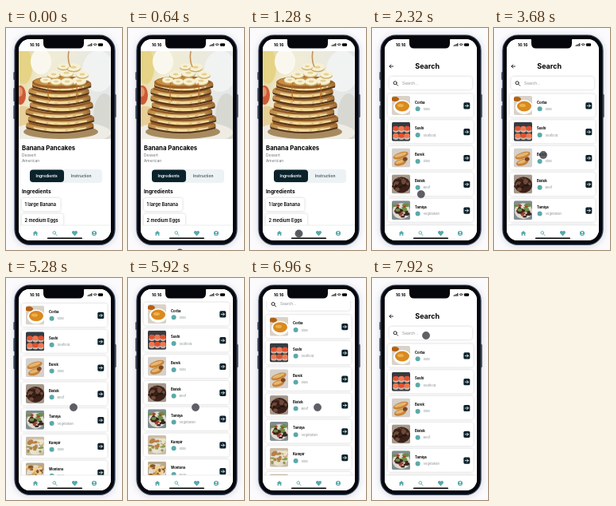
Animation of 146x278 px, one loop 8 s. Source, as an HTML page:

```html
<!DOCTYPE html>
<html lang="en">
<head>
<meta charset="utf-8">
<style>
html, body { margin: 0; width: 100%; height: 100%; overflow: hidden; background: #fbfbfd; }
svg { display: block; width: 100vw; height: 100vh; font-family: Inter, "Open Sans", sans-serif; }
.b { font-weight: 700; }
.m { font-weight: 600; }
.body { filter: drop-shadow(0 1px 4px #8888a050); }
.card { fill: #fff; filter: drop-shadow(0 .5px 1.4px #0003); }
.line { fill: none; stroke-linecap: round; stroke-linejoin: round; }
.grey { fill: #8a8f94; }
</style>
</head>
<body>
<svg viewBox="0 0 146 278">
  <defs>
    <clipPath id="screen"><rect x="16" y="14" width="116" height="252" rx="14"/></clipPath>
    <clipPath id="photo"><rect x="16" y="29" width="116" height="110"/></clipPath>
    <clipPath id="thumb"><rect width="23" height="24" rx="2"/></clipPath>
    <linearGradient id="room" x2="1" y2=".3">
      <stop offset="0" stop-color="#e0cf8c"/><stop offset=".3" stop-color="#f1ecd4"/><stop offset="1" stop-color="#e4e7e8"/>
    </linearGradient>
    <linearGradient id="cake" x2="1">
      <stop offset="0" stop-color="#b98643"/><stop offset=".4" stop-color="#ecd08a"/><stop offset=".75" stop-color="#dcb871"/><stop offset="1" stop-color="#99672f"/>
    </linearGradient>
  </defs>

  <g fill="#27303d">
    <rect x="9.4" y="55" width="2" height="10" rx="1"/>
    <rect x="9.4" y="75" width="2" height="17" rx="1"/>
    <rect x="9.4" y="97" width="2" height="17" rx="1"/>
    <rect x="136.6" y="83" width="2" height="29" rx="1"/>
  </g>
  <rect class="body" x="11" y="9" width="126" height="262.4" rx="19" fill="#05070c" stroke="#35425a" stroke-width="1.2"/>

  <g clip-path="url(#screen)">
    <rect x="16" y="13" width="116" height="253" fill="#fff"/>
    <g id="recipe">
      <g id="pancakes" clip-path="url(#photo)"></g>
      <text class="b" x="20" y="153.2" font-size="7.8">Banana Pancakes</text>
      <g font-size="4.9" fill="#6c7075">
        <text x="20" y="161">Dessert</text>
        <text x="20" y="168">American</text>
      </g>
      <rect x="30" y="177" width="91" height="17" rx="4" fill="#edf2f4"/>
      <rect x="30" y="177.5" width="43" height="15.5" rx="4" fill="#0b222b"/>
      <g class="m" font-size="5">
        <text x="37.5" y="187" fill="#fff">Ingredients</text>
        <text x="82" y="187" fill="#39444b" font-weight="500">Instruction</text>
      </g>
      <text class="b" x="20" y="206.5" font-size="6.6">Ingredients</text>
      <rect class="card" x="20" y="213" width="48.5" height="16" rx="3"/>
      <rect class="card" x="20" y="232.5" width="52" height="16" rx="3"/>
      <g class="m" font-size="5.7">
        <text x="23.5" y="223.2">1 large Banana</text>
        <text x="23.5" y="242.5">2 medium Eggs</text>
      </g>
    </g>
    <g id="search">
      <path class="line" d="M26.5 48h-4.5m2-2l-2 2 2 2" stroke="#111" stroke-width=".9"/>
      <text class="b" x="69.7" y="51.3" font-size="9" text-anchor="middle">Search</text>
      <rect class="card" x="21.5" y="61" width="104.5" height="16" rx="4"/>
      <path class="line" d="M31 70.6l1.6 1.6M31.2 68.8a2 2 0 1 1-4 0 2 2 0 1 1 4 0" stroke="#111" stroke-width=".9"/>
      <text class="grey" x="38" y="70.8" font-size="4.9">Search...</text>
      <g id="list"></g>
    </g>

    <rect x="16" y="13" width="116" height="15.5" fill="#fff"/>
    <text class="b" x="30" y="22.8" font-size="5">16:16</text>
    <path d="M102.5 22.7v-1.2h1v1.2zm1.6 0v-2h1v2zm1.6 0v-2.8h1v2.8zm1.6 0v-3.6h1v3.6z"/>
    <path class="line" d="M110 20.4q2.2-1.8 4.4 0M111 21.6q1.2-.9 2.4 0" stroke="#000" stroke-width=".8"/>
    <rect x="116" y="19.2" width="6" height="3.5" rx="1"/>
    <path d="M45 13h55q-2 0-2 3v3.5q0 6-6 6H53q-6 0-6-6V16q0-3-2-3" fill="#05070c"/>

    <rect x="16" y="247" width="116" height="19" fill="#fff"/>
    <path d="M16 247h116" stroke="#dde2e4" stroke-width=".6"/>
    <g fill="#58a8a9">
      <path d="M37 253.9l3.3 3h-.9v3h-1.6V258h-1.6v1.9h-1.6v-3h-.9z"/>
      <path d="M86.5 260.4l-2.8-2.8c-2.1-2.3 1-5 2.8-2.8 1.8-2.2 4.9.5 2.8 2.8z"/>
      <circle cx="111" cy="257" r="3.1"/>
      <path class="line" d="M62.3 258l1.7 1.7M62.6 256.4a1.8 1.8 0 1 1-3.6 0 1.8 1.8 0 1 1 3.6 0" stroke="#58a8a9" stroke-width=".9"/>
    </g>
    <circle cx="111" cy="256" r="1" fill="#fff"/>
    <path d="M109.2 258.8q1.8-2 3.6 0" fill="#fff"/>
    <rect x="52" y="262.6" width="44" height="1.5" rx=".7"/>
  </g>
  <circle id="pointer" r="4.7" fill="#3f4247" fill-opacity=".84" stroke="#303338" stroke-opacity=".6" stroke-width=".6"/>
</svg>
<script>
const $ = id => document.getElementById(id);
const ellipse = (x, y, rx, ry, fill) => `<ellipse cx="${x}" cy="${y}" rx="${rx}" ry="${ry}" fill="${fill}"/>`;
let seed = 5;
const rnd = () => (seed = seed * 16807 % 2147483647) / 2147483647;

// A sagging pancake: dark underside, pale edge, browned top
function pancake(x, y, w) {
  const shape = (dy, h, fill) => `<path d="M${x} ${y + dy}q${w / 2} ${h} ${w} 0q2-5-5-7q${5 - w / 2} ${h} ${10 - w} 0q-8 2-5 7" fill="${fill}"/>`;
  return shape(3, 12, '#54331a') + shape(1, 12, 'url(#cake)') +
    `<path d="M${x + 3} ${y - 4}q${w / 2 - 3} 11 ${w - 6} 0" fill="none" stroke="#935a25" stroke-width="2.6"/>` +
    `<path d="M${x + 9} ${y + 2}q${w / 2 - 9} 7 ${w - 18} 0" fill="none" stroke="#f4e2ad" stroke-width="1.6" stroke-dasharray="13 3 7 4"/>`;
}

function drawPancakes() {
  let s = '<rect x="16" y="29" width="116" height="110" fill="url(#room)"/>' +
    ellipse(23, 48, 10, 22, '#e6d385') + ellipse(44, 42, 13, 16, '#faf8ee') + ellipse(116, 54, 20, 26, '#f1f3f3') +
    ellipse(18, 84, 7, 12, '#cf5a36') + ellipse(17, 80, 4, 6, '#e4976b') +
    ellipse(22, 116, 16, 18, '#e8cf98') + ellipse(124, 112, 14, 30, '#d8d8d2') +
    ellipse(70, 131, 62, 15, '#eeece4') + ellipse(69, 130, 47, 9, '#a78b5f');
  for (let i = 0; i < 7; i++) {
    const w = 84 - i * 1.8;
    s += pancake(68 - w / 2 + Math.sin(i * 2.4) * 2.4, 123 - i * 8.6, w);
  }
  s += ellipse(68, 68, 35, 8, '#9c5f26') + ellipse(65, 67, 30, 5.5, '#c68c42');
  for (const [x, y, r] of [[50, 65, 7], [63, 67, 7], [92, 66, 9], [77, 67, 8], [60, 58, 8], [96, 58, 8], [76, 56, 9], [85, 49, 9], [72, 48, 7]])
    s += ellipse(x, y + 1.4, r, r * .55, '#c9aa66') + ellipse(x, y, r, r * .55, '#f7f0d3') + ellipse(x, y, r * .4, r * .18, '#e4d194');
  return s + '<path d="M79 29q-2 12 2 20M54 68q-3 13 1 24M88 69q3 11 0 19" fill="none" stroke="#b66b1f" stroke-opacity=".7" stroke-width="1.6"/>';
}

// name, category, backdrop, food tones
const meals = [
  ['Corba', 'Side', '#d9d2c8', '#fff', '#d98a20', '#b5600f'],
  ['Sushi', 'Seafood', '#353b42', '#e2502f', '#ef7850', '#c9b9ac'],
  ['Burek', 'Side', '#d5d0cb', '#c98339', '#e5b66d', '#7a4520'],
  ['Bistek', 'Beef', '#a5988c', '#3b2119', '#6f4a38', '#241511'],
  ['Tamiya', 'Vegetarian', '#7f8d90', '#39261f', '#6f8d43', '#a93e2c'],
  ['Kumpir', 'Side', '#cdbda8', '#eee2c5', '#b78046', '#8d9b4f'],
  ['Wontons', 'Pork', '#b8a88e', '#d9a955', '#efd194', '#8b5625'],
  ['Lasagne', 'Pasta', '#d6cfc4', '#b6472d', '#e7b668', '#8a2f20']
];

function food(i, [, , back, a, b, c]) {
  let s = `<rect width="23" height="24" fill="${back}"/>`;
  if (i === 0)
    s += ellipse(13, 14, 11, 9, a) + ellipse(13, 13, 9, 6.5, b) + ellipse(11, 12, 4, 2, '#edb04a') + ellipse(4, 4, 5, 3, c);
  else if (i === 1)
    for (let k = 0; k < 6; k++) {
      const x = 5 + k % 3 * 7, y = 8 + (k / 3 | 0) * 9;
      s += ellipse(x, y + 2.5, 3.6, 2.6, c) + ellipse(x, y, 3.8, 3, k % 2 ? b : a);
    }
  else if (i === 2)
    s += '<g transform="rotate(-18 12 12)">' + ellipse(12, 9, 10, 4, a) + ellipse(12, 8, 8, 2, b) +
      ellipse(9, 17, 8, 4, a) + ellipse(9, 16, 6, 2, b) + ellipse(16, 15, 3, 2.5, c) + '</g>';
  else {
    s += ellipse(12, 13, 11, 10, i === 3 ? a : '#dfdbd2');
    for (let k = 0; k < 26; k++)
      s += ellipse(3 + rnd() * 17, 5 + rnd() * 15, 1.5 + rnd() * 2, 1 + rnd() * 1.6, [a, b, c][k % 3]);
  }
  return s;
}

$('pancakes').innerHTML = drawPancakes();
$('list').innerHTML = meals.map((meal, i) => `<g transform="translate(0 ${i * 32.8})">
  <rect class="card" x="20" y="82.5" width="107.5" height="29" rx="3"/>
  <g transform="translate(25 85)" clip-path="url(#thumb)">${food(i, meal)}</g>
  <text class="b" x="54" y="94.6" font-size="4.2">${meal[0]}</text>
  <circle cx="57.6" cy="101.3" r="3" fill="#5ba9a9"/>
  <text class="grey" x="64.5" y="102.9" font-size="4">${meal[1]}</text>
  <rect x="115.3" y="93.3" width="8" height="8.2" rx="1.6" fill="#0b222b"/>
  <path class="line" d="M117.3 97.4h4m-1.7-1.7l1.7 1.7-1.7 1.7" stroke="#fff" stroke-width=".8"/>
</g>`).join('');

// keys: [time, values...], eased between neighbours
function track(keys, t) {
  const i = keys.findIndex(k => k[0] > t);
  if (i < 0) return keys.at(-1).slice(1);
  if (!i) return keys[0].slice(1);
  const a = keys[i - 1], b = keys[i], p = (t - a[0]) / (b[0] - a[0]), e = p * p * (3 - 2 * p);
  return a.slice(1).map((v, k) => v + (b[k + 1] - v) * e);
}
const pointerKeys = [[480, 66, 286], [1120, 61.5, 257.5], [1840, 61.5, 257.5], [2800, 62, 159],
  [3760, 62, 159], [4320, 85, 162], [7120, 85, 162], [7680, 68, 72]];
const scrollKeys = [[4480, 0], [4640, 6], [5360, 52], [6560, 52], [6960, 36.3], [7440, 0]];

function frame(now) {
  const t = now % 8000, searching = t >= 1520;
  const [x, y] = track(pointerKeys, t), [scroll] = track(scrollKeys, t);
  $('recipe').style.display = searching ? 'none' : '';
  $('search').style.display = searching ? '' : 'none';
  $('search').setAttribute('transform', `translate(0 ${-scroll})`);
  $('pointer').setAttribute('transform', `translate(${x} ${y})`);
  requestAnimationFrame(frame);
}
frame(performance.now());
</script>
</body>
</html>
```
